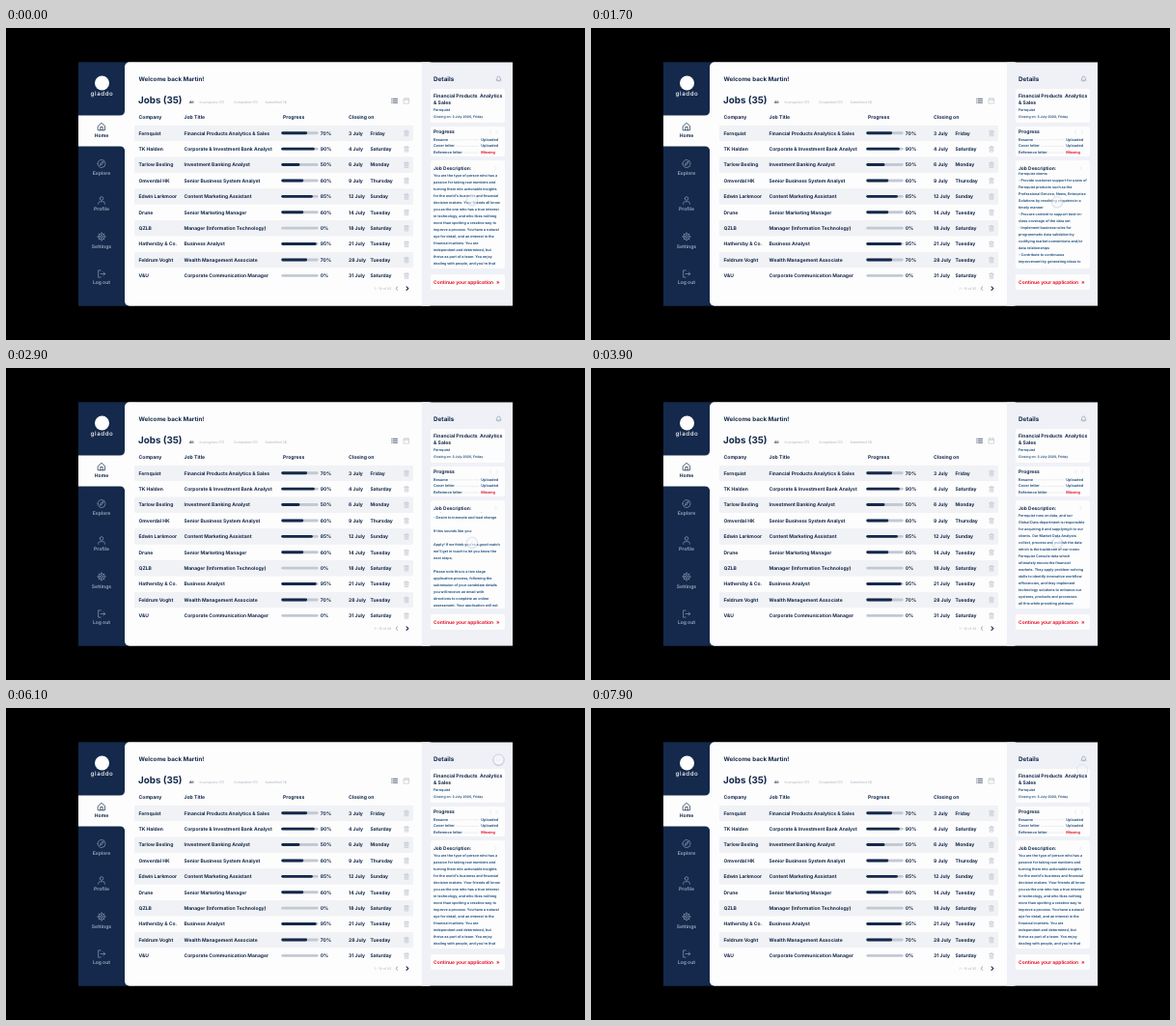
An HTML page for the animation above (8 s loop, 600 by 323 pixels).

```html
<!DOCTYPE html>
<html lang="en">
<head>
<meta charset="utf-8">
<style>
html, body { margin: 0; width: 100%; height: 100%; overflow: hidden; background: #000; }
svg { display: block; width: 100vw; height: 100vh; }
text { font-family: Inter, "Open Sans", sans-serif; font-weight: 700; text-rendering: geometricPrecision; white-space: pre; }
.line { fill: none; stroke-width: .7; stroke-linecap: round; stroke-linejoin: round; }
</style>
</head>
<body>
<svg id="stage" viewBox="0 0 600 323"></svg>
<script>
const navy = '#14294b', blue = '#2d5986', red = '#e5172f', pale = '#c2c9d3', muted = '#8f9db5', panel = '#eff1f7';

const text = (x, y, size, str, fill = navy, extra = '') =>
  `<text x="${x}" y="${y}" font-size="${size}" fill="${fill}" ${extra}>${str.replace(/&/g, '&amp;')}</text>`;
const rect = (x, y, w, h, fill, r = 0) =>
  `<rect x="${x}" y="${y}" width="${w}" height="${h}" rx="${r}" fill="${fill}"/>`;
const icon = (x, y, d, color, extra = '') =>
  `<path class="line" transform="translate(${x} ${y})" d="${d}" stroke="${color}" ${extra}/>`;

const shapes = {
  home: 'M-3.5-.5L0-3.8 3.5-.5V3.8H-3.5ZM-1.2 3.8V.5H1.2V3.8',
  compass: 'M-4 0a4 4 0 1 0 8 0a4 4 0 1 0-8 0M1.8-1.8L.7.7-1.8 1.8-.7-.7Z',
  person: 'M-1.8-2a1.8 1.8 0 1 0 3.6 0a1.8 1.8 0 1 0-3.6 0M-3.3 3.8V2.9Q-3.3 1.2-1.5 1.2H1.5Q3.3 1.2 3.3 2.9V3.8',
  gear: 'M-1.4 0a1.4 1.4 0 1 0 2.8 0a1.4 1.4 0 1 0-2.8 0M-3.2 0a3.2 3.2 0 1 0 6.4 0a3.2 3.2 0 1 0-6.4 0M0-4.2V-3.2M0 3.2V4.2M-4.2 0H-3.2M3.2 0H4.2M-3-3L-2.3-2.3M3 3L2.3 2.3M-3 3L-2.3 2.3M3-3L2.3-2.3',
  exit: 'M-.8-3.6H-3.4V3.6H-.8M-1 0H3.7M2-1.8L3.7 0 2 1.8',
  trash: 'M-2.3-1.9H2.3M-.9-1.9V-2.8H.9V-1.9M-1.8-1.9V2.8H1.8V-1.9M-.6-.6V1.5M.6-.6V1.5',
  calendar: 'M-2.6-2.2H2.6V2.8H-2.6ZM-2.6-.6H2.6M-1.3-3V-1.7M1.3-3V-1.7',
  list: 'M-2.8-2H-2.6M-1.4-2H3M-2.8 0H-2.6M-1.4 0H3M-2.8 2H-2.6M-1.4 2H3',
  bell: 'M-2.3 1.6Q-1.6.8-1.6-.7A1.6 1.6 0 0 1 1.6-.7Q1.6.8 2.3 1.6ZM-.5 2.6H.5',
  next: 'M-1-1.8L.9 0-1 1.8',
  prev: 'M1-1.8L-.9 0 1 1.8',
  close: 'M-1.5-1.5L1.5 1.5M1.5-1.5L-1.5 1.5',
  hourglass: 'M-2.3-3.2H2.3M-2.3 3.2H2.3M-1.7-3.2Q-1.7-1 0 0Q1.7 1 1.7 3.2M1.7-3.2Q1.7-1 0 0Q-1.7 1-1.7 3.2',
  sun: 'M0-3.4V-1.6M0 3.4V1.6M-3.4 0H-1.6M3.4 0H1.6M-2.4-2.4L-1.2-1.2M2.4 2.4L1.2 1.2M-2.4 2.4L-1.2 1.2M2.4-2.4L1.2-1.2',
  pencil: 'M-2.6 2.6L-2.1.8 1.6-2.9 2.9-1.6-.8 2.1ZM.6 3H3.2'
};

function sidebar() {
  const items = [['home', 'Home', 102, 113], ['compass', 'Explore', 140.5, 151.7], ['person', 'Profile', 178.5, 189.2],
    ['gear', 'Settings', 216, 227.7], ['exit', 'Log out', 254.5, 264.5]];
  return rect(75, 35.3, 60, 252.5, navy) + rect(123, 35.3, 320, 252.5, '#fdfdfd', 5) + rect(75, 86, 50, 40, '#fdfdfd') +
    `<path d="M75 80H123V85.6Q123 90.6 118 90.6H75ZM75 132H123V127.6Q123 122.6 118 122.6H75Z" fill="${navy}"/>` +
    '<circle cx="99.5" cy="57" r="7.5" fill="#fff"/>' +
    text(99.5, 70, 6.2, 'gladdo', '#fff', 'text-anchor="middle" letter-spacing=".6" style="font-weight:500"') +
    items.map(([shape, label, y, base], i) => {
      const color = i ? muted : navy;
      return icon(99, y, shapes[shape], color) + text(99, base, 5, label, color, 'text-anchor="middle"');
    }).join('');
}

const jobs = [
  ['Fernquist', 'Financial Products Analytics & Sales', 70, 3, 'Friday'],
  ['TK Halden', 'Corporate & Investment Bank Analyst', 90, 4, 'Saturday'],
  ['Tarlow Bexling', 'Investment Banking Analyst', 50, 6, 'Monday'],
  ['Omverdal HK', 'Senior Business System Analyst', 60, 9, 'Thursday'],
  ['Edwin Larkmoor', 'Content Marketing Assistant', 85, 12, 'Sunday'],
  ['Drune', 'Senior Marketing Manager', 60, 14, 'Tuesday'],
  ['QZLB', 'Manager (Information Technology)', 0, 18, 'Saturday'],
  ['Hathersby & Co.', 'Business Analyst', 95, 21, 'Tuesday'],
  ['Feldrum Voght', 'Wealth Management Associate', 70, 28, 'Tuesday'],
  ['V&U', 'Corporate Communication Manager', 0, 31, 'Saturday']
];

function table() {
  let out = text(137.5, 55.2, 6.2, 'Welcome back Martin!') + text(137, 78.2, 9.8, 'Jobs (35)') +
    text(190, 77.7, 3.5, 'All') +
    [[200.5, 'In progress (17)'], [236, 'Completed (11)'], [268.5, 'Submitted (3)']]
      .map(([x, label]) => text(x, 77.7, 3.45, label, pale)).join('') +
    icon(402.5, 75.3, shapes.list, navy) + icon(415, 75.3, shapes.calendar, pale) +
    [[137.5, 'Company'], [184.5, 'Job Title'], [287, 'Progress'], [355, 'Closing on']]
      .map(([x, label]) => text(x, 94.1, 5.1, label)).join('');
  jobs.forEach(([company, title, done, date, day], i) => {
    const y = 108.9 + i * 16.4, base = y + 1.7;
    if (i % 2 === 0) out += rect(133, y - 8.2, 289, 16.4, '#f0f2f5', 1.5);
    out += text(137.5, base, 5, company) + text(184.5, base, 5, title) +
      rect(285.3, y - 1.6, 38.3, 2.9, pale, 1.45) + rect(285.3, y - 1.6, 38.3 * done / 100, 2.9, navy, 1.45) +
      text(325.7, base, 5, done + '%') + text(355, base, 5, date + ' July') + text(377.5, base, 5, day) +
      icon(415, y, shapes.trash, pale);
  });
  return out + text(381.5, 270.8, 3.4, '1 - 10 of 35', pale) +
    icon(404.8, 269.6, shapes.prev, navy, 'opacity=".6"') + icon(416, 269.6, shapes.next, navy, 'style="stroke-width:1.1"');
}

const description = `You are the type of person who has a
passion for taking raw numbers and
turning them into actionable insights
for the world's business and financial
decision makers. Your friends all know
you as the one who has a true interest
in technology, and who likes nothing
more than spotting a creative way to
improve a process. You have a natural
eye for detail, and an interest in the
financial markets. You are
independent and determined, but
thrive as part of a team. You enjoy
dealing with people, and you're that
person others like to work with.

What's the role?
Fernquist runs on data, and our
Global Data department is responsible
for acquiring it and supplying it to our
clients. Our Market Data Analysts
collect, process and publish the data
which is the backbone of our iconic
Fernquist Console data which
ultimately moves the financial
markets. They apply problem-solving
skills to identify innovative workflow
efficiencies, and they implement
technology solutions to enhance our
systems, products and processes
all this while providing platinum
customer support to our clients.
You will join a team that takes
ownership of its own data sets.

We'll trust you to:
- Gather and check the data for
Fernquist clients
- Provide customer support for users of
Fernquist products such as the
Professional Service, News, Enterprise
Solutions by resolving enquiries in a
timely manner
- Procure content to support best-in-
class coverage of the data set
- Implement business rules for
programmatic data validation by
codifying market conventions and/or
data relationships
- Contribute to continuous
improvement by generating ideas to
make our workflows better

You'll need to have:
- A degree in finance, economics
or a related subject
- Strong interest in the markets
- Good analytical skills
- Fluency in written and spoken
English
- Attention to detail

We'd love to see:
- Some knowledge of programming
- Experience with data analysis
- Desire to innovate and lead change

If this sounds like you:

Apply! If we think you're a good match
we'll get in touch to let you know the
next steps.

Please note this is a two stage
application process, following the
submission of your candidate details
you will receive an email with
directions to complete an online
assessment. Your application will not
be considered until this assessment
has been completed.`.split('\n');

function details() {
  const card = (y, h) => rect(440, y, 77, h, '#fdfdfd', 2);
  const steps = [['Resume', 460], ['Cover letter', 467], ['Reference letter', 474]];
  return rect(431, 35.3, 94, 252.5, panel) + text(443, 55.4, 6.3, 'Details') + icon(510.5, 52.3, shapes.bell, muted) +
    card(63, 35) + text(443, 71.8, 5.05, 'Financial Products  Analytics') + text(443, 78.8, 5.05, '& Sales') +
    text(443, 86.4, 3.7, 'Fernquist', blue) + text(443, 93, 3.4, 'Closing on: 3 July 2020, Friday', blue) +
    card(102, 31) + text(443, 109.4, 5, 'Progress') +
    icon(502, 107.5, shapes.prev, pale, 'opacity=".5"') + icon(509, 107.5, shapes.next, pale, 'opacity=".5"') +
    steps.map(([label, x], i) => {
      const y = 116.8 + i * 6.6, late = i === 2;
      return text(443, y, 3.8, label, blue) + text(492.3, y, 3.8, late ? 'Missing' : 'Uploaded', late ? red : blue) +
        `<path class="line" d="M${x} ${y - 1}H490" stroke="${pale}" stroke-dasharray=".1 1.4" opacity=".7"/>`;
    }).join('') +
    card(137, 112) + text(443, 146.9, 4.9, 'Job Description:') + icon(507.5, 145, shapes.next, pale, 'opacity=".5"') +
    '<g clip-path="url(#page)"><g id="copy">' +
    description.map((line, i) => text(443, 154.2 + i * 7, 3.68, line, blue)).join('') + '</g></g>' +
    card(255, 16) + text(443, 264.6, 4.95, 'Continue your application', red) + text(508, 264.5, 5.4, '»', red);
}

function notices() {
  const rows = [['Deadline in 2 days', 'Fernquist'], ['Deadline in 3 days', 'TK Halden'], ['Deadline in 5 days', 'Tarlow Bexling'],
    ['Almost there - 95%', 'Hathersby & Co.'], ['Almost there - 80%', 'Tarnbank'], ['Almost there - 70%', 'Feldrum Voght'],
    ['Almost there - 60%', 'Drune'], ['Start applying now', 'V&U'], ['Start applying now', 'QZLB']];
  const kinds = [['hourglass', red, '#fff', red], ['sun', navy, '#fff', navy], ['pencil', '#c9d8e8', navy, navy]];
  return rect(431, 35.3, 94, 252.5, panel) + text(443, 55.4, 6.25, 'Notifications') + icon(507.5, 53.3, shapes.close, navy) +
    rows.map(([note, name], i) => {
      const y = 75 + i * 23.4, [shape, fill, ink, color] = kinds[i < 3 ? 0 : i < 7 ? 1 : 2];
      return rect(443, y - 9.7, 71, 19.4, '#fdfdfd', 2) + rect(446.2, y - 6.3, 12.6, 12.6, fill, 2) +
        icon(452.5, y, shapes[shape], ink) + text(462, y - 1.5, 3.45, note, color) +
        text(462, y + 4.4, 5, name) + icon(508, y, shapes.next, muted);
    }).join('');
}

const $ = id => document.getElementById(id);
$('stage').innerHTML = '<defs><clipPath id="page"><rect x="441" y="149.5" width="75" height="97.7"/></clipPath>' +
  '<clipPath id="side"><rect x="431" y="35.3" width="94" height="252.5"/></clipPath></defs>' +
  rect(0, 0, 600, 323, '#000') + sidebar() + table() +
  `<g clip-path="url(#side)">${details()}<g id="notices">${notices()}</g></g>` +
  '<g id="cursor"><circle cy=".6" r="6.2" fill="#50607c" opacity=".16"/>' +
  '<circle r="5.5" fill="#fbfcfe" fill-opacity=".85" stroke="#a9b2c2" stroke-width=".5"/></g>';

// Each key: [time, value, ...]
const scroll = [[0, 0], [1700, 261], [2900, 453.5], [3100, 470], [3900, 119.5], [4250, 0]];
const pointer = [[0, 483, 178, .6], [1000, 483, 180, .6], [4300, 483, 181, .6], [5000, 504, 101, 1],
  [5500, 510.5, 53.5, 1], [7400, 510.5, 53.5, 1], [7900, 509, 64, .4]];
const slide = [[6100, 0], [6450, 1], [7050, 1], [7400, 0]];

function at(keys, t) {
  const i = keys.findIndex(k => k[0] > t);
  if (i === 0) return keys[0].slice(1);
  if (i < 0) return keys[keys.length - 1].slice(1);
  const a = keys[i - 1], b = keys[i], p = (t - a[0]) / (b[0] - a[0]);
  return a.slice(1).map((v, j) => v + (b[j + 1] - v) * p);
}

function draw(now) {
  const t = now % 8000;
  const [x, y, alpha] = at(pointer, t), [open] = at(slide, t);
  const ease = open * open * (3 - 2 * open);
  $('copy').setAttribute('transform', `translate(0 ${-at(scroll, t)[0]})`);
  $('notices').setAttribute('transform', `translate(${94 * (1 - ease)} 0)`);
  $('cursor').setAttribute('transform', `translate(${x} ${y})`);
  $('cursor').setAttribute('opacity', alpha);
  requestAnimationFrame(draw);
}
draw(0);
</script>
</body>
</html>
```
